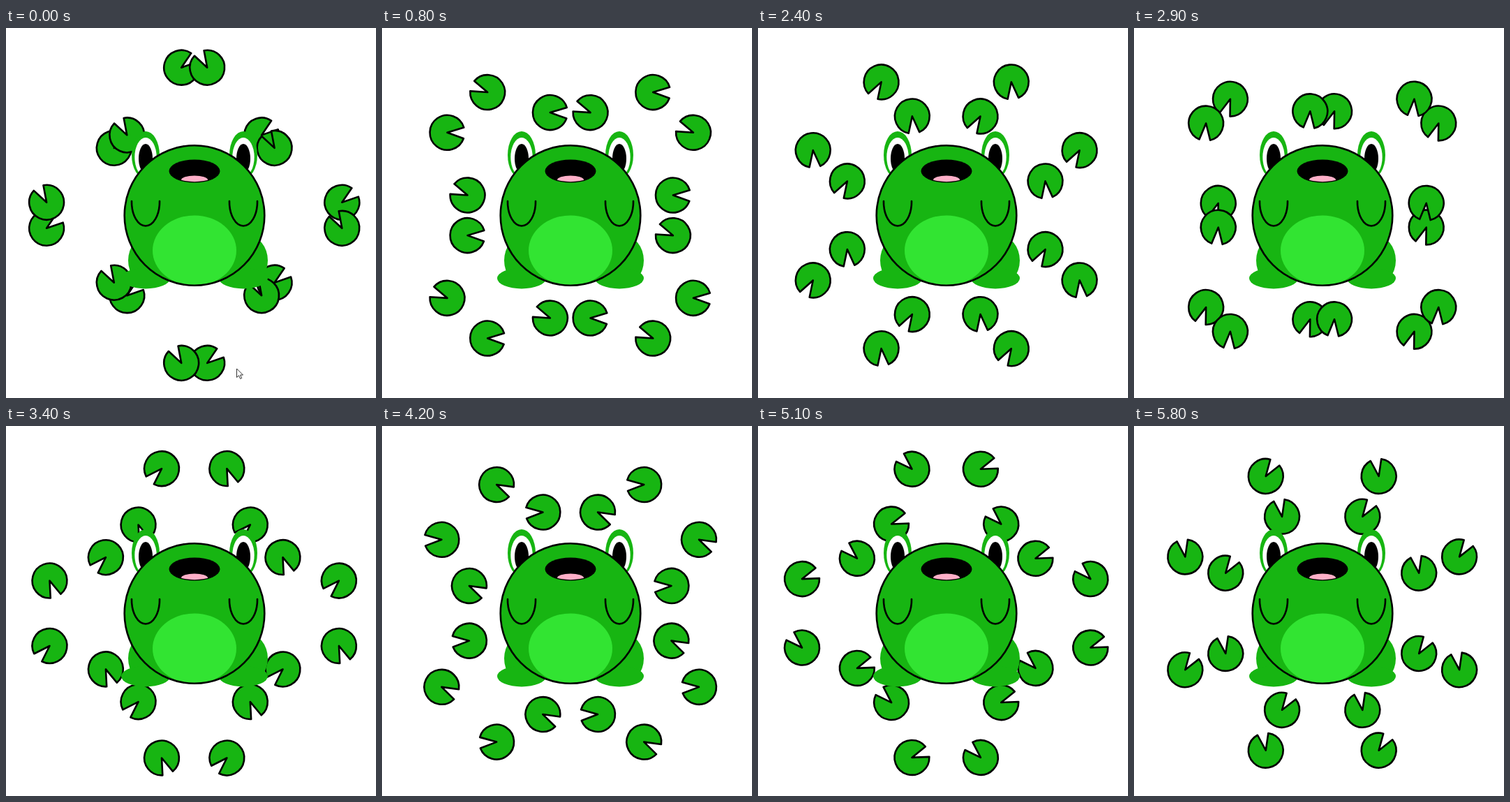
Write an HTML page that moves like this. It is 530x530 px and loops after 5.9 s.

```html
<!DOCTYPE html>
<html lang="en">
<head>
<meta charset="utf-8">
<title>Frog and lily pads</title>
<style>
  html, body { margin: 0; width: 100%; height: 100%; overflow: hidden; background: #fff; }
  svg { display: block; width: 100vw; height: 100vh; }
  .leaf { fill: #17b512; }
  .ink { stroke: #000; stroke-width: 2.6; stroke-linejoin: round; stroke-linecap: round; }
</style>
</head>
<body>
<svg viewBox="0 0 530 530">
  <defs>
    <clipPath id="lips"><ellipse cx="270" cy="205" rx="35" ry="15.2"/></clipPath>
    <g id="side">
      <ellipse class="leaf" cx="205" cy="333" rx="30" ry="36"/>
      <ellipse class="leaf" cx="200" cy="358.5" rx="35" ry="15"/>
      <ellipse class="leaf" cx="200" cy="182" rx="20" ry="34"/>
      <ellipse fill="#fff" cx="200" cy="185" rx="15.7" ry="28"/>
      <ellipse cx="200" cy="187" rx="10" ry="21"/>
    </g>
    <path id="arm" class="ink" fill="none" d="M180 248V249A20 34.5 0 0 0 220 249V248"/>
  </defs>
  <g id="pads"></g>
  <g id="frog">
    <use href="#side"/>
    <use href="#side" x="140"/>
    <circle class="leaf" cx="270" cy="268.5" r="100"/>
    <ellipse fill="#32e432" cx="270" cy="318.7" rx="60" ry="50.3"/>
    <circle class="ink" fill="none" cx="270" cy="268.5" r="100.3"/>
    <ellipse cx="270" cy="205" rx="36.5" ry="16.6"/>
    <ellipse fill="#ffafc8" cx="270" cy="217.5" rx="19" ry="6" clip-path="url(#lips)"/>
    <use href="#arm"/>
    <use href="#arm" x="140"/>
  </g>
  <path id="cursor" fill="#fff" stroke="#333" stroke-width="1"
        d="M0 0V12.5L3 9.8L5.2 14.5L7.2 13.6L5.1 9H9Z"/>
</svg>
<script>
  const LOOP = 5900, STEP = 100;
  const CX = 269.7, CY = 268.3;
  const RINGS = [{ r: 212.4, shift: 0 }, { r: 150, shift: 45 }];
  // Pads in the second group orbit the other way and lie on top.
  const GROUPS = [{ dir: 1, notch: -32.4 }, { dir: -1, notch: -124 }];
  // [ms, degrees clockwise]
  const TURN = [[0, -5], [600, 23.8], [1500, 69.35], [2400, 116], [3400, 167.3],
                [4200, 209.8], [5100, 256.6], [5800, 292.4]];
  const CURSOR = [[330.5, 488], [336, 512]];

  const rad = deg => deg * Math.PI / 180;
  const cursor = document.getElementById('cursor');
  const layer = document.getElementById('pads');
  const pads = [];

  function padShape() {
    const r = 24.9, half = rad(18.3);
    const x = r * Math.cos(half), y = r * Math.sin(half);
    return `M0 0L${x} ${y}A${r} ${r} 0 1 1 ${x} ${-y}Z`;
  }

  for (const group of GROUPS)
    for (const ring of RINGS)
      for (let k = 0; k < 4; k++) {
        const el = document.createElementNS('http://www.w3.org/2000/svg', 'path');
        el.setAttribute('class', 'leaf ink');
        el.setAttribute('d', padShape());
        layer.append(el);
        pads.push({ el, ...group, r: ring.r, start: ring.shift + 90 * k });
      }

  function turnAt(t) {
    let i = 1;
    while (i < TURN.length - 1 && t > TURN[i][0]) i++;
    const [t0, a0] = TURN[i - 1], [t1, a1] = TURN[i];
    return a0 + (a1 - a0) * (t - t0) / (t1 - t0);
  }

  function draw(t) {
    const turn = turnAt(t);
    for (const p of pads) {
      const a = rad(p.start + p.dir * turn);
      const x = CX + p.r * Math.sin(a), y = CY - p.r * Math.cos(a);
      p.el.setAttribute('transform',
        `translate(${x} ${y}) rotate(${p.notch + p.dir * turn})`);
    }
    const spot = CURSOR[t / STEP];
    cursor.style.display = spot ? '' : 'none';
    if (spot) cursor.setAttribute('transform', `translate(${spot})`);
  }

  const begin = performance.now();
  function tick() {
    const t = (performance.now() - begin) % LOOP;
    draw(Math.floor(t / STEP) * STEP);
    requestAnimationFrame(tick);
  }
  draw(0);
  requestAnimationFrame(tick);
</script>
</body>
</html>
```
